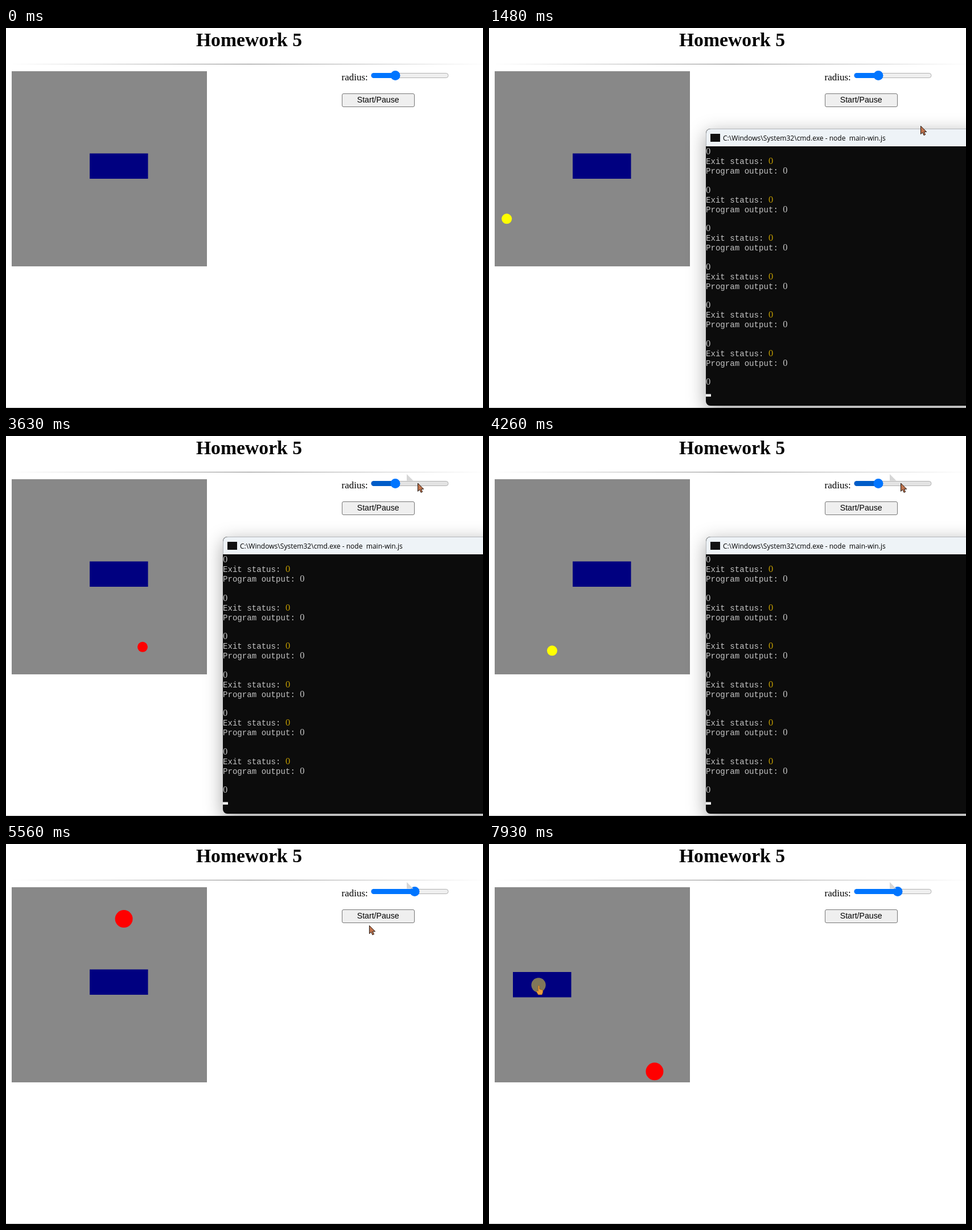
An HTML page for the animation above (8 s loop, 838 px wide and 668 px high).

```html
<!DOCTYPE html>
<html lang="en">
<head>
<meta charset="utf-8">
<title>Homework 5</title>
<style>
  html, body { margin: 0; width: 100%; height: 100%; overflow: hidden; background: #fff; }
  svg { display: block; width: 838px; height: 668px; }
  text { white-space: pre; }
  .serif { font-family: "Liberation Serif", serif; }
  .button { font: 14.16px "Liberation Sans", sans-serif; }
  .title { font: 12.05px "Open Sans", sans-serif; }
  .console { font: 14.1px "Liberation Mono", monospace; fill: #c4c4c4; }
  .console .zero { font: 16.5px "Liberation Serif", serif; }
  .console .status { fill: #c19c00; }
  #terminal { filter: drop-shadow(0 8px 16px rgba(0, 0, 0, .36)); }
</style>
</head>
<body>
<svg viewBox="0 0 838 668">
  <defs>
    <linearGradient id="fade">
      <stop offset="0" stop-color="#808080" stop-opacity="0"/>
      <stop offset=".5" stop-color="#808080"/>
      <stop offset="1" stop-color="#808080" stop-opacity="0"/>
    </linearGradient>
  </defs>
  <text class="serif" x="427" y="32" font-size="33.7" font-weight="bold" text-anchor="middle">Homework 5</text>
  <rect x="8" y="63" width="838" height="1" fill="url(#fade)"/>
  <rect y="667" width="838" height="1" fill="#c4c4c4"/>

  <rect x="10" y="76" width="343" height="343" fill="#888"/>
  <rect id="box" width="102.5" height="44.5" fill="#000080"/>
  <circle id="ball"/>

  <text class="serif" x="589.5" y="92" font-size="17">radius:</text>
  <rect id="track" x="642" y="79.5" width="135" height="8" rx="4" stroke="#b2b2b2"/>
  <rect id="filled" x="641.5" y="79" height="9" rx="4.5"/>
  <circle id="thumb" cy="83.5" r="8.5" fill="#0075ff"/>
  <rect id="button" x="590.5" y="115.5" width="127" height="23" rx="2.5" stroke="#767676"/>
  <text class="button" x="653.7" y="131" text-anchor="middle">Start/Pause</text>
  <path id="trail" d="M704 67L715.5 78.5H704Z" fill="#d6d6d6"/>

  <g id="terminal">
    <rect x="381" y="177" width="480" height="487" rx="8" fill="#0c0c0c"/>
    <path d="M381.5 208V186Q381.5 177.5 390 177.5H840V208" fill="#eef3f7" stroke="#b4b7bb"/>
    <rect x="389" y="186" width="17" height="14" fill="#111"/>
    <text class="title" x="411" y="197.5">C:\Windows\System32\cmd.exe - node  main-win.js</text>
    <g id="lines" class="console"></g>
    <rect id="caret" x="381" y="643.5" width="9" height="4.5" fill="#f2f2f2"/>
  </g>

  <g id="pointer">
    <path id="arrow" d="M.5 0V14.3L3.7 11.3L6 16.3L8.6 15.1L6.3 10.3H10.7Z" fill="#c0744e" stroke="#22150f"/>
    <g id="hand">
      <circle r="12.7" fill="#ffee33" fill-opacity=".5"/>
      <path d="M-.8 1.5Q.5 0 1.8 1.5V7L7 8.5Q8.3 9.5 7.5 13L6 17H-.5L-4 11Q-4 9-2 10L-.8 11Z" fill="#e69c3c" stroke="#8a5a20" stroke-width=".7"/>
    </g>
  </g>
</svg>
<script>
const LOOP = 8000;
const START = 893, SLIDER_CLICK = 4320, PAUSE = 6425, GRAB = 7000;
const STEP = 4;
const FIELD = { left: 10, top: 76, right: 352.6, bottom: 418.6 };
const BOX = { x: 147, y: 220.5, width: 102.5 };
const HIT_DEPTH = 27; // a ball from below sinks this far into the box
const HOLD = { x: 45, y: 23 };

// Pointer stops: time, x, y. The last ones drag the box.
const STOPS = [[40, 790, 580], [560, 650, 122], [900, 650, 122], [1400, 763, 185],
  [2050, 723, 83], [4850, 723, 83], [5450, 633, 149], [5950, 655, 124], [6550, 655, 124],
  [GRAB, 192, 243.5], [7150, 154, 248], [7300, 198, 254], [7800, 87, 248]];

const $ = id => document.getElementById(id);

function set(id, attributes) {
  for (const name in attributes) $(id).setAttribute(name, attributes[name]);
}

function show(id, visible) {
  $(id).style.display = visible ? "" : "none";
}

function pointerAt(t) {
  const next = STOPS.findIndex(stop => stop[0] > t);
  if (next < 1) return STOPS.at(next).slice(1);
  const [t0, x0, y0] = STOPS[next - 1], [t1, x1, y1] = STOPS[next];
  const part = (t - t0) / (t1 - t0);
  return [x0 + (x1 - x0) * part, y0 + (y1 - y0) * part];
}

// Steady flight with bounces off the walls and the box; each box hit swaps the colour.
function ballAt(t) {
  const ball = { x: 152, y: 247.5, r: 9, color: "#ff0" };
  let vx = -0.2055, vy = 0.404;
  for (let now = START; now < Math.min(t, PAUSE); now += STEP) {
    if (now >= SLIDER_CLICK) ball.r = 15.5;
    ball.x += vx * STEP;
    ball.y += vy * STEP;
    if (ball.x < FIELD.left + ball.r) vx = Math.abs(vx);
    if (ball.x > FIELD.right - ball.r) vx = -Math.abs(vx);
    if (ball.y < FIELD.top + ball.r) vy = Math.abs(vy);
    if (ball.y > FIELD.bottom - ball.r) {
      ball.y = FIELD.bottom - ball.r;
      vy = -Math.abs(vy);
    }
    const above = ball.x > BOX.x && ball.x < BOX.x + BOX.width;
    if (above && ball.y > BOX.y - ball.r && ball.y < BOX.y + HIT_DEPTH) {
      vy = -vy;
      ball.y += vy * STEP;
      ball.color = ball.color === "#ff0" ? "#f00" : "#ff0";
    }
  }
  return ball;
}

function buildConsole() {
  const column = n => 381 + n * 8.46;
  const text = (n, y, content, kind = "") => `<text class="${kind}" x="${column(n)}" y="${y}">${content}</text>`;
  let html = "";
  for (let i = 0; i < 7; i++) {
    const y = 222 + i * 67.5;
    html += text(0, y, "0", "zero");
    if (i === 6) break;
    html += text(0, y + 17, "Exit status:") + text(13, y + 17, "0", "zero status")
      + text(0, y + 34, "Program output:") + text(16, y + 34, "0", "zero");
  }
  $("lines").innerHTML = html;
}

function draw(t) {
  const [px, py] = pointerAt(t);
  const dragging = t >= GRAB;
  const over = (left, top, right, bottom) => t >= 40 && px > left && px < right && py > top && py < bottom;
  const sliderHover = over(641, 74, 778, 93);
  const thumbX = t >= SLIDER_CLICK ? 718 : 684;
  const ball = ballAt(t);

  set("box", dragging ? { x: px - HOLD.x, y: py - HOLD.y } : { x: BOX.x, y: BOX.y });
  set("ball", { cx: ball.x, cy: ball.y, r: ball.r, fill: ball.color });
  show("ball", t >= START);

  set("track", { fill: sliderHover ? "#e3e3e3" : "#efefef" });
  set("filled", { width: thumbX - 641.5, fill: sliderHover ? "#005cc8" : "#0075ff" });
  set("thumb", { cx: thumbX });
  set("button", { fill: over(590, 116, 718, 138) ? "#e5e5e5" : "#efefef" });
  show("trail", t >= 2050);

  show("terminal", t >= START && t < SLIDER_CLICK);
  show("caret", t % 1060 < 530);

  set("pointer", { transform: `translate(${px} ${py})` });
  show("pointer", t >= 40);
  show("arrow", !dragging);
  show("hand", dragging);
}

function tick() {
  draw(performance.now() % LOOP);
  requestAnimationFrame(tick);
}

buildConsole();
tick();
</script>
</body>
</html>
```
